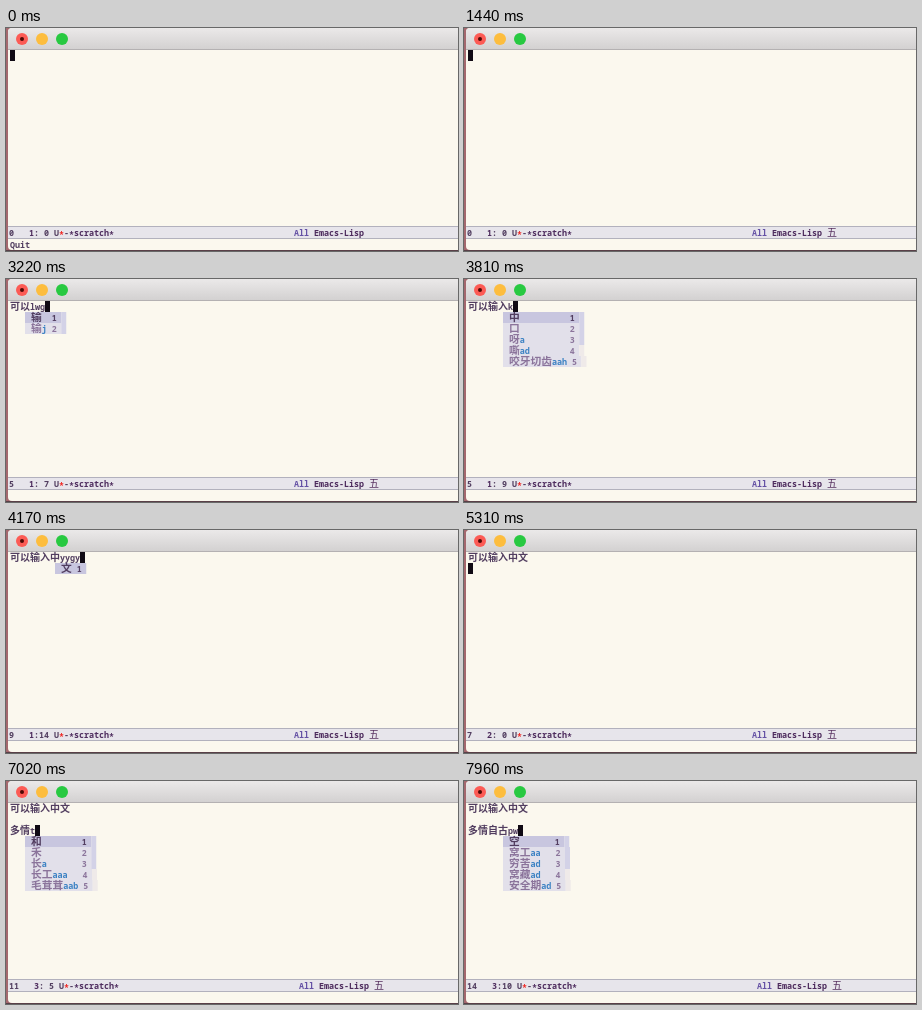
Write an HTML page with a canvas that moves like this. It is 452x223 px and loops after 8 s.

```html
<!DOCTYPE html>
<html lang="zh">
<head>
<meta charset="utf-8">
<title>Emacs input method</title>
<style>
html, body { margin: 0; width: 100%; height: 100%; overflow: hidden; background: #fbf8ef; }
canvas { display: block; width: 452px; height: 223px; }
</style>
</head>
<body>
<canvas id="stage"></canvas>
<script>
const W = 452, H = 223, LOOP = 8000;
const CELL = 5, LINE = 11, LEFT = 4, TOP = 22;
const LATIN = '"Noto Sans Mono", "DejaVu Sans Mono", monospace';
const HAN = '"Noto Sans CJK SC", "Noto Sans CJK", sans-serif';
const INK = '#523e60', DARK = '#4c2a5c', PALE = '#8b749b';

const canvas = document.getElementById('stage');
const ctx = canvas.getContext('2d');
const ratio = window.devicePixelRatio || 1;
canvas.width = W * ratio;
canvas.height = H * ratio;
ctx.scale(ratio, ratio);

const DONE = '可以输入中文';
const POEM = DONE + '\n\n';

// [start time, buffer text, popup candidates]
const steps = [
  [0, ''],
  [2150, 's'],
  [2210, 's', '要 木 杠a 村a 木工aaa'],
  [2270, 'sk', '可 哥s 可可sk 可是jg 可望而不可即a'],
  [2330, '可'],
  [2570, '可c'],
  [2630, '可以'],
  [2870, '可以l'],
  [2930, '可以l', '国 四 轼aa 国家ad 车水马龙aai'],
  [3050, '可以lw', '轮 输g 囚禁aa 输出bm 罗马数字aa'],
  [3220, '可以lwg', '输 输j'],
  [3340, '可以输'],
  [3640, '可以输t', '和 禾 长a 长工aaa 毛茸茸aab'],
  [3720, '可以输入'],
  [3810, '可以输入k', '中 口 呀a 嘶ad 咬牙切齿aah'],
  [3870, '可以输入中'],
  [3990, '可以输入中yy', '方 文g 谅i 访n 主y'],
  [4170, '可以输入中yygy', '文'],
  [4590, DONE],
  [5310, DONE + '\n'],
  [5420, POEM],
  [5900, POEM + 'q', '我 金 儿a 勾aa 金工aa'],
  [6080, POEM + '多'],
  [6250, POEM + '多n'],
  [6310, POEM + '多n', '民 已 民工aaa 展期aad 民革aaf'],
  [6430, POEM + '多ng', '情 恒j 怀i 悟k 惰da'],
  [6490, POEM + '多nge', '情 情g 愫i'],
  [6960, POEM + '多情'],
  [7020, POEM + '多情t', '和 禾 长a 长工aaa 毛茸茸aab'],
  [7080, POEM + '多情th', '自 息n 自己nn 身tm 自卑aaa'],
  [7250, POEM + '多情thd', '自 鼻l 自在dh'],
  [7310, POEM + '多情自'],
  [7730, POEM + '多情自d', '在 大 左a 左右dk 大英雄aam'],
  [7790, POEM + '多情自dgh', '古 胡e 故t'],
  [7900, POEM + '多情自古'],
  [7960, POEM + '多情自古pw', '空 窝工aa 穷苦ad 窝藏ad 安全期ad']
];

const isHan = ch => ch > '\u2e80';
const columns = s => [...s].reduce((n, ch) => n + (isHan(ch) ? 2 : 1), 0);

function box(x, y, w, h, color) {
  ctx.fillStyle = color;
  ctx.fillRect(x, y, w, h);
}

function disc(x, y, r, color) {
  ctx.beginPath();
  ctx.arc(x, y, r, 0, 2 * Math.PI);
  ctx.fillStyle = color;
  ctx.fill();
}

// Draws text on the cell grid and returns the x after the last glyph.
function write(s, x, y, color = INK, weight = 600, hanWidth = 10) {
  ctx.fillStyle = color;
  for (const ch of s) {
    const han = isHan(ch);
    ctx.font = han ? `${weight} ${hanWidth}px ${HAN}` : `${weight} 8.4px ${LATIN}`;
    // Asterisks sit at mid height.
    ctx.fillText(ch, x, ch === '*' ? y + 1.5 : y);
    x += han ? hanWidth : CELL;
  }
  return x;
}

function drawWindow() {
  box(0, 0, W, H, '#a4686e');
  box(0, H - 1, W, 1, '#5a4048');
  ctx.save();
  ctx.beginPath();
  ctx.roundRect(2, 0, W + 10, H - 1, 4);
  ctx.clip();
  box(2, 0, W, H, '#fbf8ee');
  const bar = ctx.createLinearGradient(0, 0, 0, 21);
  bar.addColorStop(0, '#ebe9e9');
  bar.addColorStop(1, '#d3d1d1');
  box(2, 0, W, 21, bar);
  box(2, 21, W, 1, '#b4b1b2');
  ctx.restore();
  disc(16, 11, 6, '#fc5b55');
  disc(36, 11, 6, '#fdbd3e');
  disc(56, 11, 6, '#28c941');
  disc(16, 11, 2, '#4d0905');
}

function drawModeLine(text, row, col, active) {
  box(2, 198, W - 2, 13, '#b2b1bd');
  box(2, 199, W - 2, 11, '#e7e5eb');
  const y = 208;
  let x = write([...text].length + '   ', 3, y);
  x = write(String(row + 1), x, y, DARK, 700);
  x = write(':' + String(col).padStart(2) + ' U', x, y);
  x = write('*', x, y, '#f0201c', 700);
  x = write('-', x, y);
  x = write('*scratch*', x, y, DARK, 700);
  x = write('All', x + 36 * CELL, y, '#6450a4');
  x = write('Emacs-Lisp', x + CELL, y, DARK);
  if (active) write('五', x + CELL, y, '#57305f', 500);
}

function drawPopup(list, x, y) {
  const items = list.split(' ');
  const wide = Math.max(...items.map(columns));
  items.forEach((item, i) => {
    const top = y + i * LINE, base = top + 9;
    const hans = [...item].filter(isHan).length;
    const digit = x + 6 + hans * 0.75 + (wide + 1) * CELL;
    const right = digit + 9.5;
    box(x, top, right - x, LINE, i ? '#e2e0ea' : '#c8c6df');
    if (items.length > 1) box(right, top, CELL, LINE, i < 3 ? '#d3d2e7' : '#efeae9');
    const word = item.replace(/[a-z]+$/, '');
    const end = write(word, x + 6, base, i ? PALE : INK, 600, 10.75);
    write(item.slice(word.length), end, base, '#3a81c3');
    write(String(i + 1), digit, base, i ? PALE : INK);
  });
}

function draw(t) {
  const [, text, list] = steps.findLast(s => s[0] <= t);
  const lines = text.split('\n');
  const row = lines.length - 1;
  const col = columns(lines[row]);
  const cursorX = LEFT + col * CELL, cursorY = TOP + row * LINE;

  drawWindow();
  lines.forEach((s, i) => write(s, LEFT, TOP + i * LINE + 9));
  box(cursorX, cursorY, CELL, LINE, '#100a14');
  if (list) {
    const keys = text.match(/[a-z]*$/)[0].length;
    drawPopup(list, Math.max(LEFT, cursorX - (keys + 1) * CELL), cursorY + LINE);
  }
  drawModeLine(text, row, col, t >= 1440);
  if (t < 1380) write('Quit', LEFT, 220);
}

const start = performance.now();
function tick() {
  draw((performance.now() - start) % LOOP);
  requestAnimationFrame(tick);
}
tick();
</script>
</body>
</html>
```
